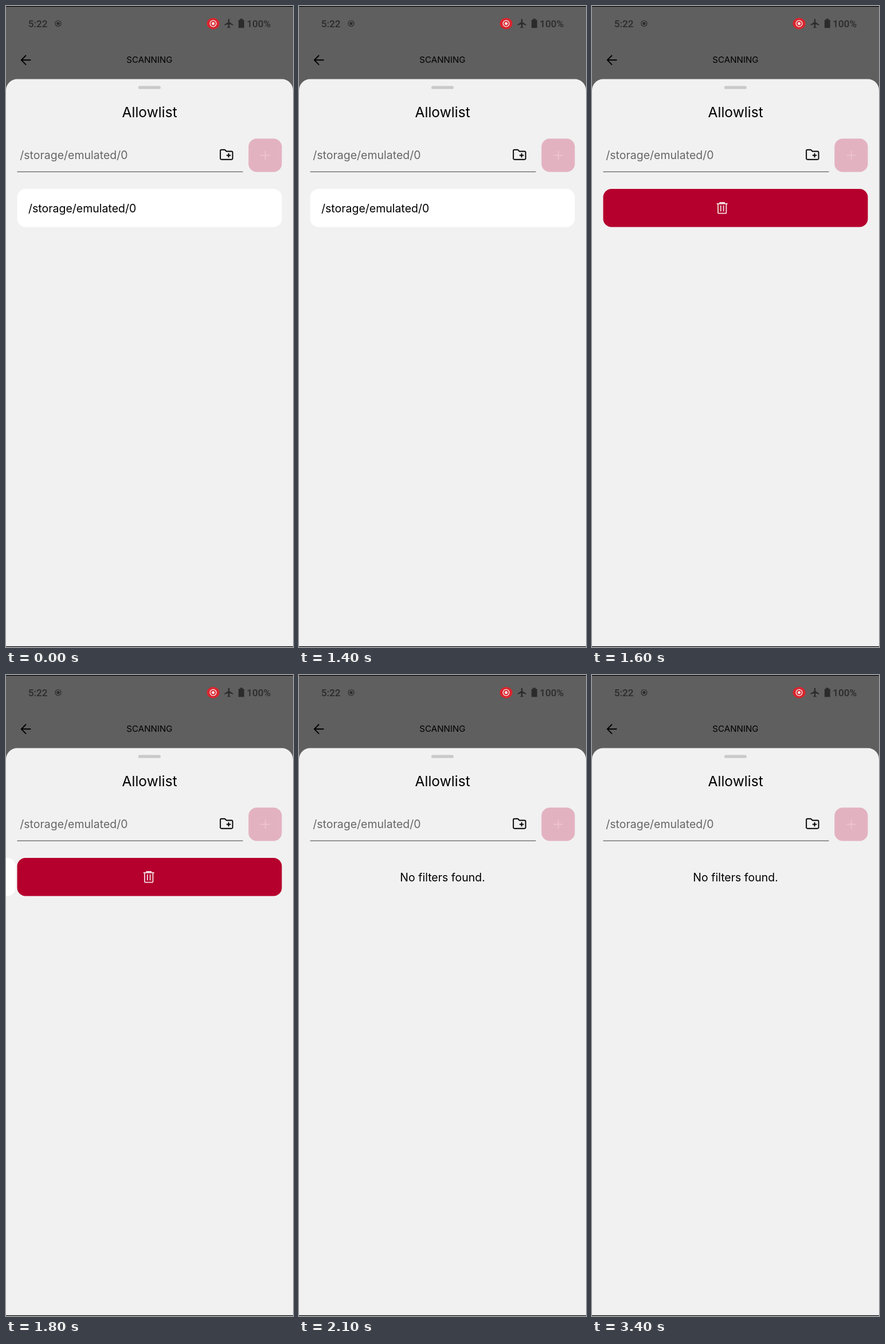
An HTML page that plays this animation: 501 px wide and 1118 px high, repeating every 3500 ms.

```html
<!DOCTYPE html>
<html lang="en">
<head>
<meta charset="utf-8">
<title>Allowlist</title>
<style>
  html, body { margin: 0; width: 100%; height: 100%; overflow: hidden; background: #5f5f5f; }
  svg { display: block; width: 100%; height: 100%; }
  text { font: 19.5px Inter, sans-serif; font-optical-sizing: none; }
  .status { font: 500 17.1px Roboto, sans-serif; fill: #2b2b2b; }
  .mid { text-anchor: middle; }
  .line { fill: none; stroke: #000; stroke-width: 1.9; }
</style>
</head>
<body>
<svg viewBox="0 0 501 1118">
  <rect width="501" height="1118" fill="#5f5f5f"/>
  <rect width="501" height="1.2"/>

  <!-- status bar -->
  <text class="status" x="38.7" y="36.7">5:22</text>
  <circle cx="91" cy="30.5" r="5" fill="none" stroke="#2b2b2b" stroke-width="1.2"/>
  <circle cx="91" cy="30.5" r="2.6" fill="#2b2b2b"/>
  <ellipse cx="361.6" cy="30.6" rx="11" ry="9.8" fill="#d9252e"/>
  <circle cx="361.6" cy="30.6" r="5.4" fill="none" stroke="#f6dcdd" stroke-width="1.5"/>
  <circle cx="361.6" cy="30.6" r="2.6" fill="#f6dcdd"/>
  <path transform="translate(379.8 21) scale(.8)" fill="#2b2b2b"
    d="M21 16v-2l-8-5V3.5a1.5 1.5 0 0 0-3 0V9l-8 5v2l8-2.5V19l-2 1.5V22l3.5-1 3.5 1v-1.5L13 19v-5.5z"/>
  <path d="M408.5 22.3h4.6v2h2.6v14h-9.8v-14h2.6z" fill="#2b2b2b"/>
  <text class="status" x="420.3" y="36.9">100%</text>

  <!-- header -->
  <path class="line" d="M43.3 94.3H27M35 86l-8.2 8.3 8.2 8.3"/>
  <text class="mid" x="250.5" y="99.4" style="font-size:15.1px">SCANNING</text>

  <!-- sheet -->
  <path d="M0 1118V147a19.5 19.5 0 0 1 19.5-19.5h462A19.5 19.5 0 0 1 501 147v971z" fill="#f1f1f1"/>
  <rect x="231" y="139.6" width="39" height="5.2" rx="2.6" fill="#c9c9c9"/>
  <text class="mid" x="250.6" y="193.8" style="font-size:24.6px">Allowlist</text>
  <text x="24.2" y="267.3" fill="#666">/storage/emulated/0</text>
  <rect x="19.5" y="288.5" width="394" height="1.4" fill="#6f6f6f"/>
  <path class="line" stroke-linejoin="round"
    d="M376 250.8h6.2l2.6 2.7h9a1.8 1.8 0 0 1 1.8 1.8v10.6a1.8 1.8 0 0 1-1.8 1.8h-17.8a1.8 1.8 0 0 1-1.8-1.8v-13.3a1.8 1.8 0 0 1 1.8-1.8zM388.6 256.8v7.4M384.9 260.5h7.4"/>
  <rect x="423.3" y="231.2" width="58.2" height="58.4" rx="14.6" fill="#e3b2c1"/>
  <path d="M452.6 252.4v16M444.6 260.4h16" stroke="#efc6d1" stroke-width="1.5"/>

  <!-- list -->
  <text id="empty" class="mid" x="250.6" y="359.8">No filters found.</text>
  <g id="row">
    <g id="under">
      <rect x="19.5" y="319" width="462" height="66.5" rx="14.6" fill="#b5002d"/>
      <path id="bin" fill="none" stroke="#f3dde2" stroke-width="1.8"
        d="M-9.5-7.4h19M-4-7.4v-1.8h8v1.8M-7.2-7.4V8.2a1.3 1.3 0 0 0 1.3 1.3H5.9a1.3 1.3 0 0 0 1.3-1.3V-7.4M-2.4-4.4V6M2.4-4.4V6"/>
    </g>
    <g id="card">
      <rect x="19.5" y="319" width="462" height="66.5" rx="14.6" fill="#fff"/>
      <text x="39" y="359.8">/storage/emulated/0</text>
    </g>
  </g>
  <rect y="1116.8" width="501" height="1.2"/>
</svg>
<script>
  const LOOP = 3500, STEP = 100, DELETED = 2100;
  const $ = id => document.getElementById(id);
  const show = (id, on) => $(id).setAttribute("display", on ? "inline" : "none");
  const move = (id, x, y = 0) => $(id).setAttribute("transform", `translate(${x} ${y})`);

  // swipe out past the edge, then settle back to the row width
  function swipe(t, start, mid, peak, rest) {
    const n = (t - 1400) / 100;
    if (n <= 0) return start;
    if (n <= 1) return start + (mid - start) * n;
    if (n <= 2) return mid + (peak - mid) * (n - 1);
    return rest + (peak - rest) * Math.exp(-1.5 * (n - 2));
  }

  function draw(now) {
    const t = Math.floor(now % LOOP / STEP) * STEP;
    show("row", t < DELETED);
    show("empty", t >= DELETED);
    show("under", t > 1400);
    move("card", swipe(t, 0, -290.5, -509, -462.5));
    move("bin", swipe(t, 481.5, 331, 227.2, 250.4), 352.2);
    requestAnimationFrame(draw);
  }
  draw(performance.now());
</script>
</body>
</html>
```
